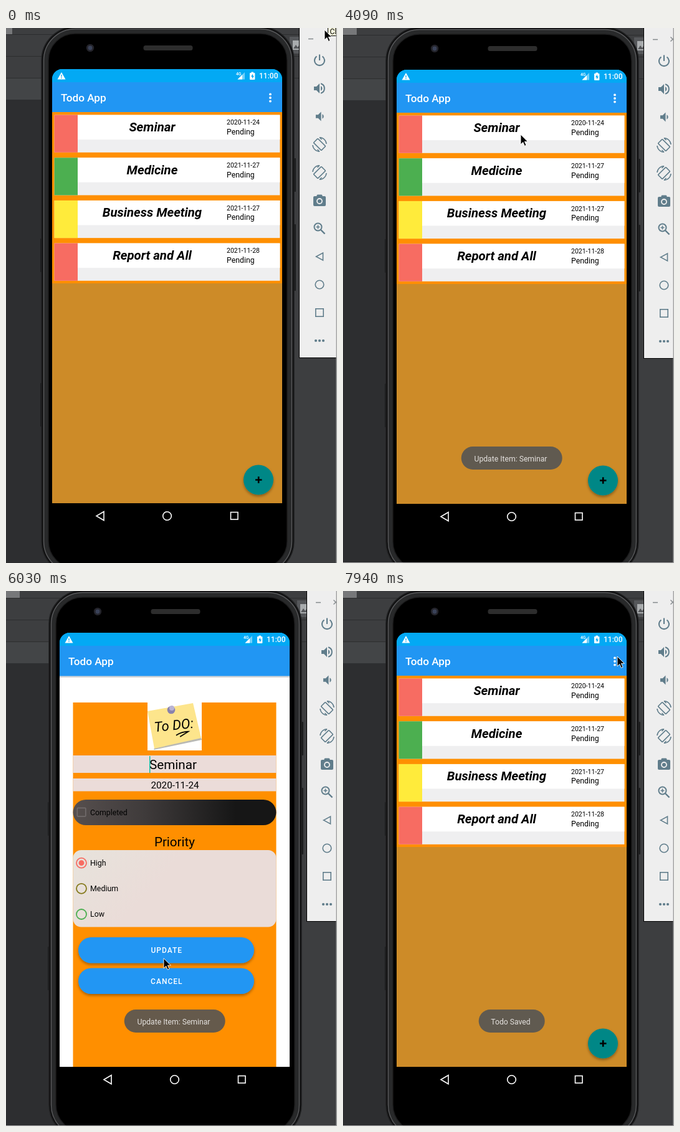
Animation, 531 px wide and 859 px high, one loop 8 s. Source, as an HTML page:

```html
<!DOCTYPE html>
<html lang="en">
<head>
<meta charset="utf-8">
<title>Todo App</title>
<style>
html, body { margin: 0; width: 531px; height: 859px; overflow: hidden; background: #3c3f41; }
svg { display: block; font-family: Roboto, sans-serif; }
.mid { text-anchor: middle; }
.line { fill: none; stroke-width: 1.6; }
</style>
</head>
<body>
<svg id="scene" width="531" height="859" viewBox="0 0 531 859">
  <defs>
    <linearGradient id="pill"><stop stop-color="#564f4e"/><stop offset=".35" stop-color="#3f3b3b"/><stop offset=".8" stop-color="#161616"/></linearGradient>
    <linearGradient id="panel" y2=".35"><stop stop-color="#e7e3dc"/><stop offset=".5" stop-color="#eadcd8"/></linearGradient>
    <filter id="shadow" x="-30%" y="-30%" width="160%" height="170%"><feDropShadow dx="0" dy="2.5" stdDeviation="2" flood-opacity=".35"/></filter>
  </defs>
  <g id="stage"></g>
  <g id="form"></g>
  <rect x="529.5" width="1.5" height="859" fill="#a5a5a5"/>
  <rect id="edge" y="858" width="531" height="1" fill="#a5a5a5"/>
  <g id="updateToast"></g>
  <g id="savedToast"></g>
  <path id="cursor" d="M0 0V16L3.8 12.4L6.4 18.4L9 17.2L6.4 11.4H11.4Z" stroke="#fff" stroke-width=".9"/>
</svg>
<script>
const $ = id => document.getElementById(id);
const rect = (x, y, w, h, fill, r = 0, more = '') =>
  `<rect x="${x}" y="${y}" width="${w}" height="${h}" rx="${r}" fill="${fill}" ${more}/>`;
const circle = (x, y, r, fill, more = '') => `<circle cx="${x}" cy="${y}" r="${r}" fill="${fill}" ${more}/>`;
const path = (d, more = '') => `<path d="${d}" ${more}/>`;
const text = (s, x, y, size, more = '') => `<text x="${x}" y="${y}" font-size="${size}" ${more}>${s}</text>`;
const group = (more, ...parts) => `<g ${more}>${parts.join('')}</g>`;
const title = (x, y) => text('Todo App', x, y, 17.2, 'fill="#fff" font-weight="500"');
const three = (make, middle, gap) => [-1, 0, 1].map(i => make(middle + i * gap)).join('');
const topCorners = (bottom, fill) => path(`M74 ${bottom}V82A16 16 0 0 1 90 66H427A16 16 0 0 1 443 82V${bottom}Z`, `fill="${fill}"`);

function desktop() {
  return rect(-20, -5, 560, 870, '#3d3e40') + rect(-20, 115, 90, 750, '#2d2e30') +
    rect(-20, 80, 90, 35, '#434547') + rect(-20, -5, 30, 16, '#77787a') +
    three(y => rect(-20, y, 551, 1, '#2c2d2e'), 45, 35) +
    rect(455, 14, 20, 27, '#55575a') + rect(460, 20, 12, 15, '#a9acae') + path('M461 33l4-6 3 4 2-3 2 5z', 'fill="#55575a"');
}

function phone() {
  const key = (x, y, h) => rect(x, y, 3, h, '#1c1d1e', 1);
  const ring = (inset, fill, stroke) =>
    rect(57 + inset, inset - 2, 405 - 2 * inset, 880 - 2 * inset, fill, 54 - inset, `stroke="${stroke}" stroke-width="1.5"`);
  return key(55, 338, 54) + key(55, 570, 70) + key(462, 209, 54) + key(462, 315, 107) +
    ring(0, '#101011', '#202122') + ring(3.5, '#28292a', '#58595b') + ring(11, '#000', '#1c1c1d') +
    circle(135, 32, 6.2, '#24242b') + circle(135, 32, 3.4, '#3a4258') +
    rect(220.5, 28, 79, 8, '#2d2d2d', 3.5) +
    group('class="line" stroke="#fff"', path('M157 776.5V790.5L145 783.5Z'),
      circle(258.5, 783.5, 6.8, 'none'), rect(360.5, 777.5, 11.5, 11.5, 'none')) +
    topCorners(140, '#03a9f4');
}

function row([name, date, color], i) {
  const y = 139.6 + i * 68.67;
  return rect(77.6, y, 361.8, 60.2, '#efeff0') + rect(115, y, 324.4, 39.5, '#fff') + rect(77.6, y, 37.4, 60.2, color) +
    text(name, 234.5, y + 26.4, 20.4, 'class="mid" font-weight="700" font-style="italic"') +
    text(date, 354, y + 15.7, 10.5) + text('Pending', 354, y + 31.4, 12.3);
}

function list() {
  const rows = [
    ['Seminar', '2020-11-24', '#f76c62'], ['Medicine', '2021-11-27', '#4caf50'],
    ['Business Meeting', '2021-11-27', '#ffeb3b'], ['Report and All', '2021-11-28', '#f76c62'],
  ];
  return group('id="list"', rect(74, 82, 369, 6, '#03a9f4'), rect(74, 87, 369, 49, '#2196f3'), title(88, 118),
    three(y => circle(424, y, 1.9, '#fff'), 112, 5.6),
    rect(74, 135, 369, 628, '#cd8b28'), rect(74, 135, 369, 275, '#ff8f00'), ...rows.map(row),
    circle(405, 725.5, 24, '#018786', 'filter="url(#shadow)"'),
    path('M400 725.5h10.5M405.2 720.3v10.5', 'stroke="#000" stroke-width="2.6"'));
}

function statusBar() {
  return topCorners(87, '#03a9f4') + path('M89 71L95.5 82.5H82.5Z', 'fill="#fff"') +
    path('M89 75v3.6M89 79.6v1.5', 'stroke="#03a9f4" stroke-width="1.3"') +
    text('4G', 369, 76, 6.8, 'fill="#fff" font-weight="500"') +
    path('M383 71V82.5H371.5Z', 'fill="#fff" opacity=".45"') + path('M379 75V82.5H371.5Z', 'fill="#fff"') +
    rect(391, 72, 8.4, 11, '#fff', 1) + rect(393.4, 70.6, 3.6, 2, '#fff') +
    path('M396 73.5L393 78.3H395V81.5L398 76.7H396Z', 'fill="#03a9f4"') +
    text('11:00', 406, 81, 12, 'fill="#fff" font-weight="500"');
}

function toolbar() {
  const at = (y, ...parts) => group(`transform="translate(503 ${y})"`, ...parts);
  const speaker = path('M-9 -3V3H-5L0 8V-8L-5 -3ZM2 -4A4.5 4.5 0 0 1 2 4Z', 'fill="#607d8b"');
  const turn = group('class="line"', rect(-4.8, -8.8, 9.6, 17.6, 'none', 1, 'transform="rotate(-45)"'),
    path('M0 -11.2A11 11 0 0 1 11 -1M0 11.2A11 11 0 0 1 -11 1'),
    path('M0 -11.5L3.5 -8M0 11.5L-3.5 8'));
  return rect(470.5, -5, 60, 534.5, '#eee', 0, 'stroke="#000"') +
    group('stroke="#607d8b" class="line"',
      at(51, path('M-4.5 -5.5A8 8 0 1 0 4.5 -5.5M0 -8.5V1', 'stroke-width="2.1"')),
      at(97, group('stroke="none"', speaker), path('M2 -7.7A8 8 0 0 1 2 7.7', 'stroke-width="2"')),
      at(142, group('stroke="none" transform="translate(2.5) scale(.95)"', speaker)),
      at(187, turn), at(232, group('transform="scale(-1 1)"', turn)),
      at(277, group('stroke="none"', rect(-10, -7, 20, 16, '#607d8b', 2), rect(-4.5, -9.5, 9, 4, '#607d8b', 1.5)),
        circle(0, 1, 4, '#607d8b', 'stroke="#eee" stroke-width="1.8"')),
      at(322, circle(-2.5, -2.5, 6, 'none', 'stroke-width="2"'), path('M2 2L8.5 8.5', 'stroke-width="2.4"'),
        path('M-5.5 -2.5h6M-2.5 -5.5v6')),
      at(367, path('M5.5 -6V6L-5.5 0Z')), at(412, circle(0, 0, 6.8, 'none')),
      at(457, rect(-6.2, -6.2, 12.4, 12.4, 'none'))) +
    three(x => circle(x, 502, 2.1, '#607d8b'), 503, 6) +
    path('M485 17.5h8M513.5 13.5l7 7M520.5 13.5l-7 7', 'stroke="#83898c" stroke-width="1.4"') +
    group('id="tip"', rect(511, 11, 19, 12, '#eee'), rect(516.5, -4.5, 30, 17, '#ffffe1', 0, 'stroke="#000"'),
      text('Close', 519.5, 10, 12));
}

function stickyNote() {
  return rect(227, 179, 87, 77, '#fff') + path('M237 255L314 239L312 233L240 246Z', 'fill="#b9b9b4"') +
    path('M227 193L300 180L313 236L238 253Z', 'fill="#fde58c"') +
    circle(265, 191, 6.3, '#8a83ad') + circle(266, 188, 4, '#b9b3d3') +
    group('transform="translate(270 223) rotate(-6)"', text('To DO:', 0, 0, 22, 'class="mid" font-style="italic"'),
      path('M2 9Q12 4 22 5L8 12', 'fill="none" stroke="#000" stroke-width="1.8"'));
}

function buildForm() {
  const radio = (name, y, color) => circle(121, y, 8, 'none', `stroke="${color}" stroke-width="1.8"`) +
    text(name, 135, y + 4.4, 12.4);
  const button = (name, y) => rect(116, y, 282, 41.5, '#2196f3', 20.7, 'filter="url(#shadow)"') +
    text(name, 257.8, y + 25, 12, 'class="mid" fill="#fff" font-weight="500" letter-spacing="1"');
  return rect(86, 88, 369, 676, '#fff') + rect(86, 136, 369, 3, '#bbb', 0, 'opacity=".6"') +
    rect(86, 88, 369, 48.5, '#2196f3') + title(100, 119) +
    rect(107.5, 179, 326, 585, '#ff8f00') + stickyNote() +
    rect(107.5, 264, 326, 28, '#ebdcd9') + text('Seminar', 268, 286.3, 20.7, 'class="mid"') +
    rect(230, 265, 1.4, 27, '#00bfa5', 0, 'id="caret"') +
    rect(107.5, 301, 326, 20.5, '#ebdcd9') + text('2020-11-24', 271, 317, 15.3, 'class="mid"') +
    rect(107.5, 335, 326, 41, 'url(#pill)', 20.5) +
    rect(114.3, 348.3, 13.5, 13.5, 'none', 1, 'stroke="#706a6a" stroke-width="1.7"') +
    text('Completed', 135, 360, 12.3) +
    text('Priority', 270.5, 410.3, 20.6, 'class="mid"') + rect(107.5, 416, 326, 123.5, 'url(#panel)', 13) +
    radio('High', 436.7, '#f76c62') + circle(121, 436.7, 4.4, '#f76c62') +
    radio('Medium', 477.8, '#857a1c') + radio('Low', 519, '#4caf50') +
    button('UPDATE', 556) + button('CANCEL', 605.5);
}

const toast = (s, w) => rect(270.7 - w / 2, 672, w, 37, 'rgba(85,85,85,.9)', 18.5) +
  text(s, 269, 696, 12.2, 'class="mid" fill="#e4e1de"');

$('stage').innerHTML = desktop() + phone() + list() + statusBar() + toolbar();
$('form').innerHTML = buildForm();
$('updateToast').innerHTML = toast('Update Item: Seminar', 162);
$('savedToast').innerHTML = toast('Todo Saved', 106);

// Eased progress from start to end, advancing at the recording's frame rate
const STEP = 138;
function ease(t, start, end) {
  const steps = Math.round((end - start) / STEP);
  const p = Math.min(1, Math.max(0, Math.floor((t - start) / STEP) / steps));
  return p * p * (3 - 2 * p);
}

// Pointer moves: start, end, destination
const moves = [
  [0, 690, 273, 120], [690, 1090, 345, 10], [1100, 1650, 340, -25],
  [2230, 2800, 307, 151], [3090, 3230, 305, 164], [3370, 3790, 285, 171],
  [4090, 5060, 191, 455], [5070, 5210, 175, 441], [5350, 6040, 262, 607],
  [6040, 6450, 279, 576], [6720, 7410, 412, 122], [7520, 7940, 440, 105],
];
function pointer(t) {
  let x = 511, y = 3;
  for (const [start, end, toX, toY] of moves) {
    const p = ease(t, start, end);
    x += (toX - x) * p;
    y += (toY - y) * p;
  }
  return [x, y];
}

function draw(now) {
  const t = now % 8000, moved = t >= 2070;
  const editing = t >= 4228 && t < 6865, leaving = t >= 6865 && t < 7000;
  const swap = ease(t, 6580, 7000);
  const move = (id, x, y) => $(id).setAttribute('transform', `translate(${x} ${y})`);
  const show = (id, alpha) => $(id).setAttribute('opacity', +alpha);
  move('stage', moved ? 12 : 0, moved ? 1 : 0);
  move('list', 0, leaving ? 11 : 0);
  move('cursor', ...pointer(t));
  show('edge', moved);
  show('tip', t < 120);
  show('form', editing ? 1 : leaving ? .08 : 0);
  show('updateToast', ease(t, 3370, 3790) * (1 - swap));
  show('savedToast', swap);
  show('caret', (t + 50) % 1000 < 500);
  requestAnimationFrame(draw);
}
requestAnimationFrame(draw);
</script>
</body>
</html>
```
